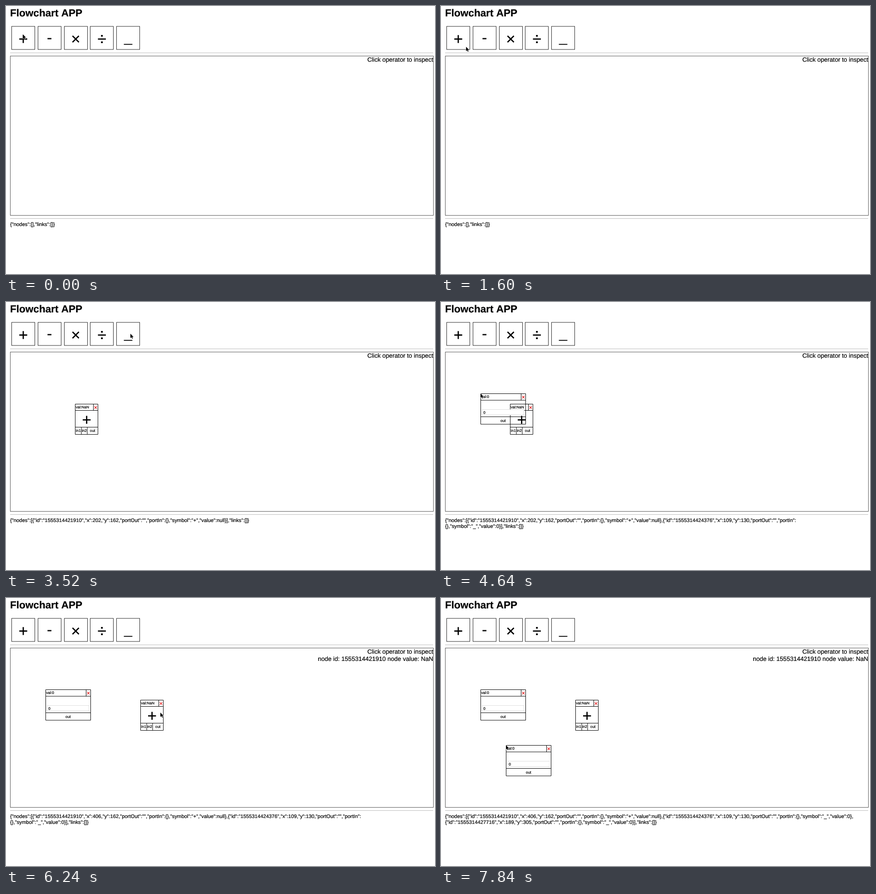
An HTML page for the animation above (8000 ms loop, 945 by 592 pixels).

```html
<!DOCTYPE html>
<html lang="en">
<head>
<meta charset="utf-8">
<title>Flowchart APP</title>
<style>
  html, body { margin: 0; width: 100%; height: 100%; overflow: hidden; background: #fff; }
  svg { display: block; width: 945px; height: 592px; }
  text { font-family: "Liberation Sans", Arial, sans-serif; font-kerning: none; text-rendering: geometricPrecision; white-space: pre; stroke: #000; stroke-width: .22; }
  .title { font-size: 22.56px; font-weight: bold; }
  .info { font-size: 13.53px; text-anchor: end; }
  .json { font-size: 11.28px; }
  .small { font-size: 8.3px; }
  .middle { text-anchor: middle; }
  .frame { fill: none; stroke: #222; }
  .node { fill: none; stroke: #000; }
  .board { fill: none; stroke: #555; }
  .rule { stroke: #bbb; }
  .input { fill: #fff; stroke: #ddd; }
  .close { stroke: #e01b1b; stroke-width: 1.3; }
  .symbol { fill: none; stroke: #000; stroke-width: 2.8; }
</style>
</head>
<body>
<svg viewBox="0 0 945 592">
  <text class="title" x="9" y="23">Flowchart APP</text>
  <g id="toolbar"></g>
  <path class="rule" d="M9 103.5H941M9 469.5H941"/>
  <rect class="board" x="9.5" y="110.5" width="932" height="352"/>
  <text class="info" x="941" y="123.2">Click operator to inspect</text>
  <text class="info" x="941" y="138.8" id="inspect">node id: 1555314421910 node value: NaN</text>
  <g id="sum"></g>
  <g id="first"></g>
  <g id="second"></g>
  <text class="json" x="9" y="486" id="line1"></text>
  <text class="json" x="9" y="498.7" id="line2"></text>
  <path id="cursor" d="M0 0V9.8L2.4 7.8L3.9 11.2L5.4 10.5L4 7.2H7Z" stroke="#fff" paint-order="stroke"/>
</svg>
<script>
const LOOP = 8000, STEP = 160, SCALE = 0.705;
const $ = id => document.getElementById(id);

const symbols = [
  '<path class="symbol" d="M-8.7 0H8.7M0-8.7V8.7"/>',
  '<path class="symbol" d="M-4.3-.9H4.3"/>',
  '<path class="symbol" d="M-7-7L7 7M7-7L-7 7"/>',
  '<path class="symbol" d="M-8.7 0H8.7"/><path d="M-1.9-9h3.8v3.8h-3.8zM-1.9 5.2h3.8v3.8h-3.8z"/>',
  '<path class="symbol" style="stroke-width:1.9" d="M-9.4 11.7H9.4"/>'
];
const place = (x, y, content) => `<g transform="translate(${x} ${y})">${content}</g>`;
const label = (x, y, text, extra = '') => `<text class="small ${extra}" x="${x}" y="${y}">${text}</text>`;
const closeMark = x => `<path class="close" d="M${x - 2.7} 5.5l5.4 5.4m0-5.4l-5.4 5.4"/>`;

$('toolbar').innerHTML = symbols.map((symbol, i) => {
  const x = 12.5 + 57.75 * i;
  return `<rect class="frame" x="${Math.floor(x) + .5}" y="45" width="51" height="51"/>` + place(x + 25.5, 73, symbol);
}).join('');

$('sum').innerHTML =
  '<path class="node" d="M.5.5h50v67H.5zM.5 14.5h50M40.5.5v14M.5 51.5h50M14 51.5v16M27 51.5v16"/>' +
  label(1.4, 10, 'val:NaN') + closeMark(45.4) + place(25.7, 35.3, symbols[0]) +
  label(1.7, 62.4, 'in1') + label(14.9, 62.4, 'in2') + label(38.6, 62.4, 'out', 'middle');

const valueNode =
  '<path class="node" d="M.5.5h99v67.5H.5zM.5 15h99M89.5.5v14.5M.5 51.5h99"/>' +
  '<rect class="input" x="4" y="35.5" width="92" height="12"/>' +
  label(1.4, 10.2, 'val:0') + closeMark(94.4) + label(6.3, 44.8, '0') + label(49.8, 62.7, 'out', 'middle');
$('first').innerHTML = $('second').innerHTML = valueNode;

// Pointer stops: time, x, y
const path = [
  [0, 37, 62.5], [320, 38, 64], [800, 56, 88], [1120, 58, 88], [1440, 38, 66],
  [2080, 148, 220], [2240, 152, 225], [2400, 154, 222], [3360, 274, 71], [3680, 274, 69],
  [4480, 92, 198], [4640, 87, 202], [4800, 89, 204], [5280, 196, 253], [5440, 196, 253],
  [5920, 340, 253], [6240, 340, 253], [6960, 272, 68], [7120, 270, 68],
  [7680, 146, 318], [7840, 143, 325], [8000, 143, 325]
];
const ease = p => p * p * (3 - 2 * p);

function pointerAt(t) {
  const i = path.findIndex((stop, n) => n && t <= stop[0]);
  const [t0, x0, y0] = path[i - 1], [t1, x1, y1] = path[i];
  const p = ease((t - t0) / (t1 - t0));
  return [x0 + (x1 - x0) * p, y0 + (y1 - y0) * p];
}

function jsonLines(nodes) {
  const text = JSON.stringify({ nodes, links: [] });
  const cut = nodes.length < 2 ? text.length
    : nodes.length === 2 ? text.lastIndexOf('{}') : text.lastIndexOf('{"id"');
  return [text.slice(0, cut), text.slice(cut)];
}

const makeNode = (id, x, y, symbol, value) => ({ id, x, y, portOut: '', portIn: {}, symbol, value });

function render(t) {
  const drag = ease(Math.min(1, Math.max(0, (t - 5440) / 480)));
  const entries = [
    ['sum', 2240, makeNode('1555314421910', Math.round(202 + 204 * drag), 162, '+', null)],
    ['first', 4640, makeNode('1555314424376', 109, 130, '_', 0)],
    ['second', 7840, makeNode('1555314427716', 189, 305, '_', 0)]
  ];
  for (const [id, start, { x, y }] of entries) {
    $(id).setAttribute('display', t >= start ? 'inline' : 'none');
    $(id).setAttribute('transform', `translate(${Math.round(9.7 + x * SCALE)} ${Math.round(110.3 + y * SCALE)})`);
  }
  const lines = jsonLines(entries.filter(e => t >= e[1]).map(e => e[2]));
  $('line1').textContent = lines[0];
  $('line2').textContent = lines[1];
  $('inspect').setAttribute('display', t >= 6080 ? 'inline' : 'none');
  $('cursor').setAttribute('transform', `translate(${pointerAt(t)})`);
}

function tick(now) {
  render(Math.floor(now % LOOP / STEP) * STEP);
  requestAnimationFrame(tick);
}
render(0);
requestAnimationFrame(tick);
</script>
</body>
</html>
```
